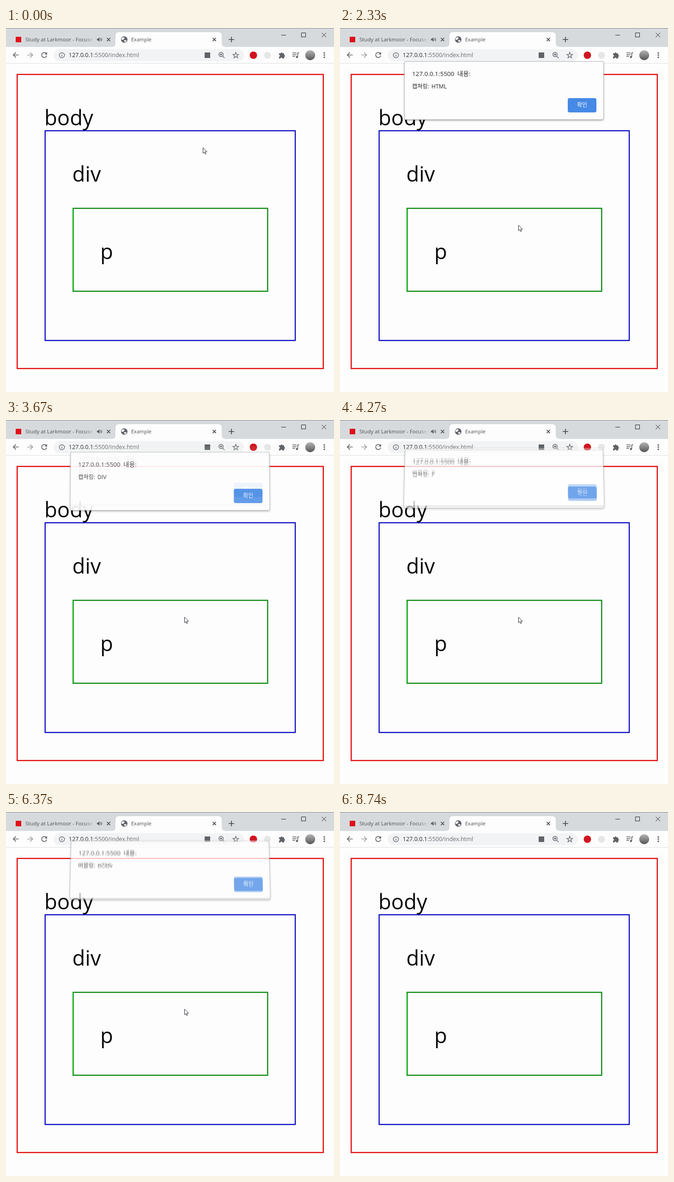
These frames come from a looping animation (710x789 px, 8.77 s). An HTML page:

```html
<!DOCTYPE html>
<html lang="ko">
<head>
<meta charset="utf-8">
<title>Example</title>
<style>
  html, body { margin: 0; width: 100%; height: 100%; overflow: hidden; background: #fdfdfd; }
  body { position: relative; font-family: "Open Sans", "Noto Sans CJK KR", "Noto Sans CJK JP", sans-serif; }
  svg { position: absolute; left: 0; top: 0; display: block; }
  .icon { fill: none; stroke: #5f6368; stroke-width: 1.7; }
  .solid { fill: #5f6368; stroke: none; }
  .label { font-size: 45.4px; fill: #0a0a0a; }
  .tab { font-size: 11px; fill: #4c5054; }
  .dialog {
    position: absolute; left: 140px; top: 73px; width: 430px; height: 125px;
    background: #fdfdfd; border-radius: 2px; opacity: 0;
    box-shadow: 0 0 0 1px #b4b4b4, 0 2px 4px rgba(0, 0, 0, .4);
  }
  .dialog div { position: absolute; left: 16px; line-height: 20px; white-space: pre; color: #26282a; }
  .dialog .head { top: 16px; font-size: 13.5px; word-spacing: 3px; }
  .dialog .note { top: 44px; font-size: 12.2px; word-spacing: 2px; }
  .dialog .ok {
    left: 353px; top: 79px; width: 62px; height: 31px; line-height: 30px;
    border-radius: 4px; background: #468ae6; color: #fff; font-size: 12px; text-align: center;
  }
</style>
</head>
<body>
<svg width="710" height="789" viewBox="0 0 710 789">
  <defs>
    <linearGradient id="fade" gradientUnits="userSpaceOnUse" x1="172" y1="0" x2="190" y2="0">
      <stop offset="0" stop-color="#4c5054"/>
      <stop offset="1" stop-color="#4c5054" stop-opacity="0"/>
    </linearGradient>
    <linearGradient id="photo" x1="0" y1="0" x2="0" y2="1">
      <stop offset="0" stop-color="#b4b4b4"/>
      <stop offset=".5" stop-color="#868686"/>
      <stop offset="1" stop-color="#555"/>
    </linearGradient>
  </defs>

  <!-- tab strip -->
  <rect width="710" height="41" fill="#d6dadd"/>
  <rect width="710" height="1" fill="#7b8794"/>
  <path d="M229 41Q237 41 237 33V17Q237 9 245 9H459Q467 9 467 17V33Q467 41 475 41Z" fill="#fdfdfd"/>
  <rect x="21" y="19" width="12" height="12" fill="#e0101a"/>
  <text class="tab" x="42" y="29" style="fill:url(#fade);font-size:11.5px">Study at Larkmoor - Focused</text>
  <path class="solid" d="M197 23h2.5l3-3v10l-3-3H197z"/>
  <path class="icon" style="stroke-width:1.1" d="M204.2 22.6q1.8 2.4 0 4.8M206 21q3 4 0 8"/>
  <circle class="solid" cx="256" cy="25" r="7"/>
  <path d="M251 21l5-1 1 2-2 1.5-1 2.5-4-1zM256 26l4 .6 1 1.4-3.4 3-1.6-2z" fill="#fdfdfd"/>
  <text class="tab" x="271" y="29">Example</text>
  <path class="icon" style="stroke:#3c4043;stroke-width:1.6"
    d="M218.5 21.5l7 7m0-7l-7 7M447.5 21.5l7 7m0-7l-7 7M482 25h12M488 19v12"/>
  <path class="icon" style="stroke:#222;stroke-width:1" d="M596 15.5h10M639.5 10.5h9v9h-9zM683.5 10.5l9.500 9.500m0-9.500l-9.500 9.500"/>

  <!-- toolbar -->
  <rect y="76" width="710" height="1" fill="#dcdedf"/>
  <rect x="103" y="46" width="412" height="26" rx="13" fill="#f1f3f4"/>
  <path class="icon" d="M27.5 58.5H16M21.5 52.8l-5.7 5.7 5.7 5.7"/>
  <path class="icon" style="stroke:#9ca0a4" d="M46 58.5h11.5M52 52.8l5.7 5.7-5.7 5.7"/>
  <path class="icon" d="M87 55a5.5 5.5 0 1 0 1.2 4.6"/>
  <path class="solid" d="M89 52v5.5h-5.5z"/>
  <circle class="icon" style="stroke-width:1.3" cx="121" cy="59" r="5.6"/>
  <path class="icon" style="stroke-width:1.4" d="M121 58.3v3.7M121 55.7v1.4"/>
  <text x="135.7" y="63.3" font-size="12.6" fill="#6a6e72"><tspan fill="#25282b">127.0.0.1</tspan>:5500/index.html</text>
  <rect class="solid" x="430" y="53" width="12" height="12"/>
  <circle class="icon" style="stroke-width:1.5" cx="465.5" cy="57.5" r="4.6"/>
  <path class="icon" style="stroke-width:1.5" d="M469 61l4 4M463 57.5h5M465.5 55v5"/>
  <path class="icon" id="star" style="stroke-width:1.3"/>
  <circle cx="535.5" cy="59" r="8" fill="#d0141f"/>
  <circle cx="566" cy="59" r="7.5" fill="#e6e6e4"/>
  <path class="solid" d="M591 55h3.5a2 2 0 1 1 4 0h3.5v3.5a2 2 0 1 1 0 4V66h-4a2 2 0 0 0-4 0H591v-3.7a2 2 0 0 0 0-4z"/>
  <path class="icon" style="stroke-width:1.6" d="M620 54h9M620 57.7h9M620 61.4h5.5M631.5 63V54H635"/>
  <circle class="solid" cx="629.7" cy="63" r="2.3"/>
  <circle cx="658.5" cy="59" r="10.7" fill="url(#photo)"/>
  <path class="solid" d="M687.5 52.5h3v3h-3zM687.5 57.3h3v3h-3zM687.5 62h3v3h-3z"/>

  <!-- page -->
  <g fill="none" stroke-width="2.4">
    <rect x="24.2" y="100.7" width="662.6" height="637.4" stroke="#e20505"/>
    <rect x="84.7" y="222.7" width="541.4" height="454.6" stroke="#0a0ac4"/>
    <rect x="145.2" y="390.9" width="421.2" height="179.7" stroke="#088810"/>
    <path d="M145.2 392V569.5" stroke="#00ac0c"/>
  </g>
  <text class="label" x="83" y="211">body</text>
  <text class="label" x="143.5" y="333">div</text>
  <text class="label" x="204" y="501">p</text>
</svg>

<svg id="pointer" width="12" height="17" viewBox="0 0 12 17">
  <path d="M.5 .5V12.5L3.3 9.9 5.2 14.3 7 13.5 5.2 9.2H9z" fill="#fff" stroke="#2a2a35"/>
</svg>

<script>
  const LOOP = 8770, FADE = 200, LAST = 6850;
  const alerts = [
    ["캡쳐링: HTML", 1350], ["캡쳐링: BODY", 2550], ["캡쳐링: DIV", 3108], ["캡쳐링: P", 3655],
    ["버블링: P", 4205], ["버블링: DIV", 4940], ["버블링: BODY", 5710], ["버블링: HTML", 6290]
  ];
  const pointer = document.getElementById("pointer");

  const progress = (t, from, span) => Math.min(1, Math.max(0, (t - from) / span));
  const smooth = p => p * p * (3 - 2 * p);
  const mix = (a, b, p) => a + (b - a) * p;

  const corners = Array.from({ length: 10 }, (_, i) => {
    const r = i % 2 ? 2.7 : 6.6, a = (i / 5 - .5) * Math.PI;
    return (497.3 + r * Math.cos(a)).toFixed(1) + " " + (59.3 + r * Math.sin(a)).toFixed(1);
  });
  document.getElementById("star").setAttribute("d", "M" + corners.join("L") + "Z");

  function makeDialog([note, start], i) {
    const el = document.createElement("div");
    el.className = "dialog";
    for (const [name, text] of [["head", "127.0.0.1:5500 내용:"], ["note", note], ["ok", "확인"]]) {
      const part = document.createElement("div");
      part.className = name;
      part.textContent = text;
      el.append(part);
    }
    document.body.insertBefore(el, pointer);
    return { el, start, end: i + 1 < alerts.length ? alerts[i + 1][1] : LAST };
  }
  const dialogs = alerts.map(makeDialog);

  // A dialog drops in while fading up, and lifts back while fading out.
  function drawDialog({ el, start, end }, t) {
    const enter = progress(t, start, FADE), leave = progress(t, end, FADE);
    const lift = Math.pow(1 - enter + leave, .7), alpha = enter * (1 - leave);
    el.style.visibility = alpha > 0 ? "visible" : "hidden";
    el.style.opacity = alpha;
    el.style.transform = lift === 0 ? "none"
      : `translateY(${-17 * lift}px) perspective(900px) rotateX(${10 * lift}deg)`;
  }

  function drawPointer(t) {
    const go = smooth(progress(t, 250, 650)), exit = smooth(progress(t, 8010, 640));
    const x = mix(mix(426, 386, go), 710, exit);
    const y = mix(mix(259, 427, go), 716, exit);
    pointer.style.transform = `translate(${x}px, ${y}px)`;
    pointer.style.visibility = exit < 1 ? "visible" : "hidden";
  }

  const begin = performance.now();
  function frame() {
    const t = (performance.now() - begin) % LOOP;
    for (const d of dialogs) drawDialog(d, t);
    drawPointer(t);
    requestAnimationFrame(frame);
  }
  frame();
</script>
</body>
</html>
```
